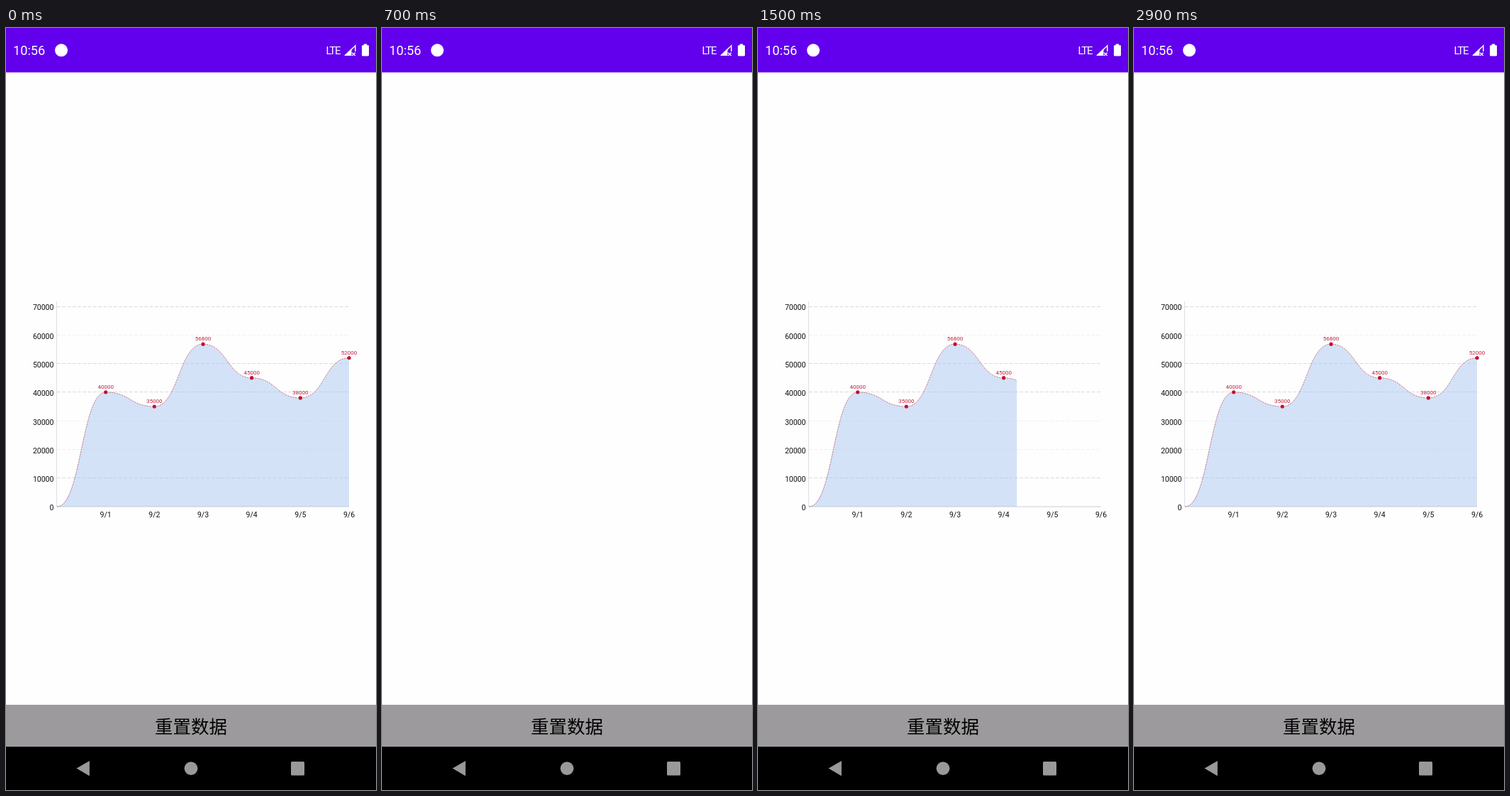
An HTML page that plays this animation: 522x1073 px, repeating every 3000 ms.

```html
<!DOCTYPE html>
<html lang="zh-CN">
<head>
<meta charset="utf-8">
<style>
  html, body { margin: 0; width: 100%; height: 100%; overflow: hidden; background: #fefefe; }
  svg { display: block; width: 100vw; height: 100vh; }
  text { font-family: Roboto, "Noto Sans", sans-serif; }
  .axis { font-size: 10.5px; fill: #111; }
  .value { font-size: 8px; fill: #bd1f42; text-anchor: middle; }
  .button { font: 25.5px "Noto Sans CJK SC", "Noto Sans CJK", sans-serif; text-anchor: middle; }
</style>
</head>
<body>
<svg viewBox="0 0 522 1073">
  <defs>
    <clipPath id="reveal"><rect id="window" x="0" y="300" width="0" height="400"/></clipPath>
  </defs>
  <rect width="522" height="1073" fill="#fefefe"/>

  <g id="status" fill="#fff">
    <rect width="522" height="62.5" fill="#6200ee"/>
    <text x="10" y="38.3" font-size="18.2">10:56</text>
    <circle cx="78" cy="31.3" r="9"/>
    <text x="451.5" y="37" font-size="15" letter-spacing="-1.2">LTE</text>
    <path d="M477 39L487.5 28.7V39Z"/>
    <path d="M479 38.2L492.8 25V33" fill="none" stroke="#fff" stroke-width="1.5"/>
    <path d="M488.3 34.7l4.4 4.4m0-4.4l-4.4 4.4" stroke="#fff" stroke-width="1.4"/>
    <path d="M504.8 22.5h4.4v1.7h1.6q1.2 0 1.2 1.2v12.9q0 1.2-1.2 1.2h-7.6q-1.2 0-1.2-1.2v-12.9q0-1.2 1.2-1.2h1.6z"/>
  </g>

  <g id="chart">
    <g id="grid"></g>
    <g id="series" clip-path="url(#reveal)"></g>
  </g>

  <rect y="953" width="522" height="59" fill="#9c9a9c"/>
  <text class="button" x="261" y="992.5">重置数据</text>
  <rect y="1012" width="522" height="61"/>
  <g fill="#999">
    <path d="M99.5 1042.6L117.8 1032V1053.2Z"/>
    <circle cx="261" cy="1042.6" r="9.4"/>
    <rect x="402" y="1033" width="19" height="19.5" rx="1.5"/>
  </g>
</svg>
<script>
const LOOP = 3000, FRAME = 100;
const CLEARED = 100, REDRAWN = 800;
const LEFT = 72, RIGHT = 484, BASE = 674;
const values = [0, 40000, 35000, 56800, 45000, 38000, 52000];

const byId = id => document.getElementById(id);
const xAt = i => LEFT + (RIGHT - LEFT) * i / (values.length - 1);
const yAt = v => BASE - v * 282 / 70000;

function add(parent, tag, attrs, content = '') {
  const el = document.createElementNS('http://www.w3.org/2000/svg', tag);
  for (const key in attrs) el.setAttribute(key, attrs[key]);
  el.textContent = content;
  parent.appendChild(el);
}

function buildGrid() {
  const grid = byId('grid');
  const faint = [20000, 30000, 60000];
  for (let v = 0; v <= 70000; v += 10000) {
    const y = yAt(v);
    add(grid, 'text', { class: 'axis', x: 67.4, y: y + 5.4, 'text-anchor': 'end' }, v);
    if (v) add(grid, 'path', {
      d: `M${LEFT} ${Math.floor(y) + .5}H${RIGHT}`,
      stroke: faint.includes(v) ? '#f0f0f0' : '#d9d9dc',
      'stroke-dasharray': '4.83 2.42'
    });
  }
  for (let i = 1; i < values.length; i++)
    add(grid, 'text', { class: 'axis', x: xAt(i), y: 689.4, 'text-anchor': 'middle' }, '9/' + i);
  add(grid, 'path', { d: `M${LEFT - .5} 385V${BASE}`, stroke: '#dfdfe4' });
  add(grid, 'path', { d: `M${LEFT - .5} ${BASE}H${RIGHT}`, stroke: '#cccdd4' });
}

function buildSeries() {
  const series = byId('series');
  let curve = `M${LEFT} ${BASE}`;
  for (let i = 1; i < values.length; i++) {
    const mid = (xAt(i - 1) + xAt(i)) / 2, y = yAt(values[i]);
    curve += `C${mid} ${yAt(values[i - 1])} ${mid} ${y} ${xAt(i)} ${y}`;
  }
  add(series, 'path', { d: `${curve}V${BASE}H${LEFT}Z`, fill: '#a9c8f2', 'fill-opacity': .5 });
  add(series, 'path', {
    d: curve, fill: 'none', stroke: '#b8455f', 'stroke-width': .7, 'stroke-dasharray': '2.4 1.2'
  });
  values.forEach((v, i) => {
    if (!i) return;
    add(series, 'circle', { cx: xAt(i), cy: yAt(v), r: 2.6, fill: '#c8102e' });
    add(series, 'text', { class: 'value', x: xAt(i), y: yAt(v) - 5 }, v);
  });
}

// The chart vanishes on reset, then the series wipes in from the left at constant speed.
function render(time) {
  const t = Math.floor(time % LOOP / FRAME) * FRAME;
  const edge = 158 + (t - 1000) * .4143;
  const whole = t < CLEARED || edge >= RIGHT;
  byId('chart').setAttribute('visibility', t >= CLEARED && t < REDRAWN ? 'hidden' : 'visible');
  byId('window').setAttribute('width', whole ? 522 : Math.max(0, edge));
}

buildGrid();
buildSeries();
const start = performance.now();
function tick() {
  render(performance.now() - start);
  requestAnimationFrame(tick);
}
tick();
</script>
</body>
</html>
```
